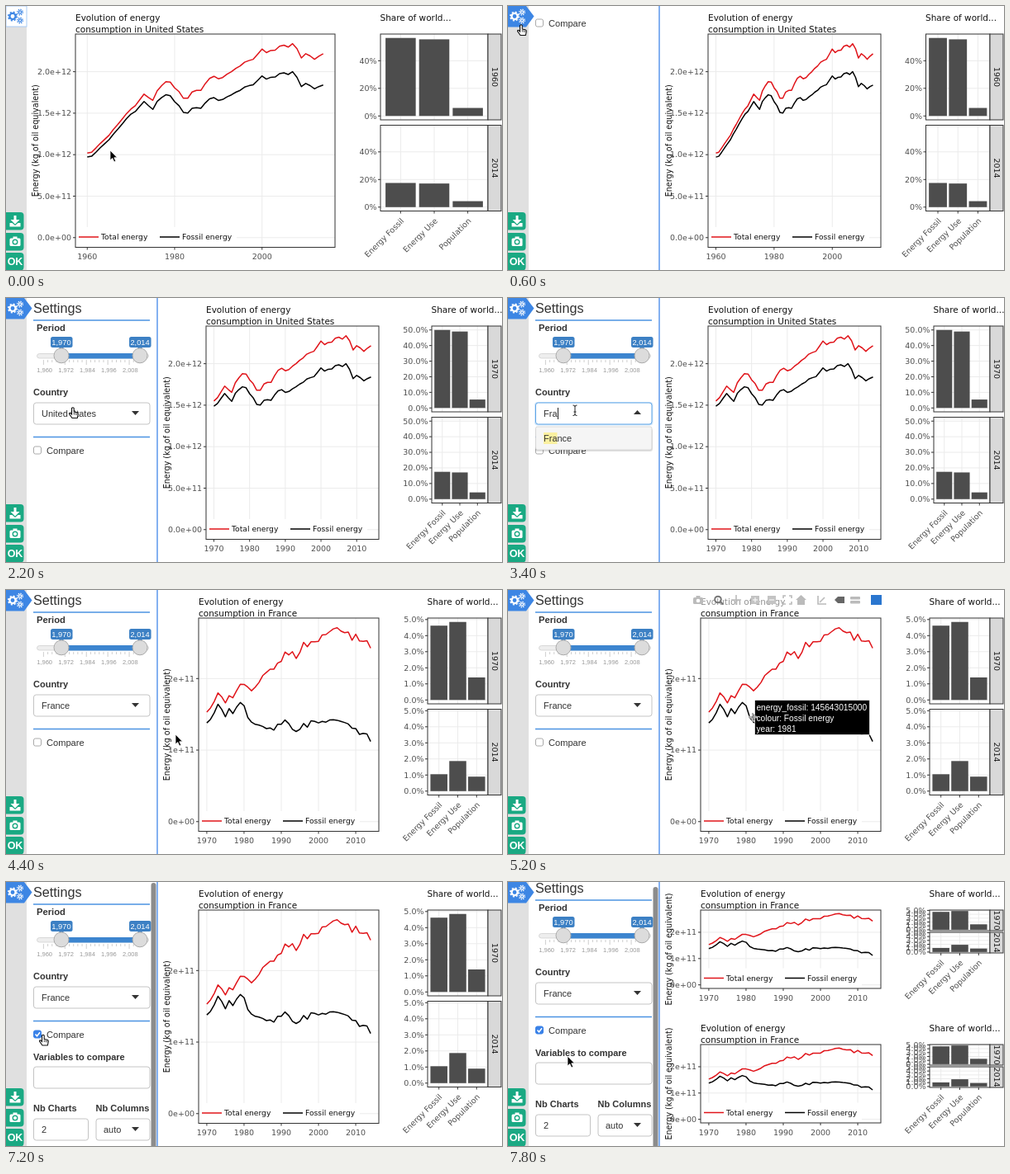
An HTML page for the animation above (8000 ms loop, 600 by 320 pixels).

```html
<!DOCTYPE html>
<html lang="en">
<head>
<meta charset="utf-8">
<title>Energy dashboard</title>
<style>
  html, body { margin: 0; width: 100%; height: 100%; overflow: hidden; background: #fff; }
  svg { display: block; width: 600px; height: 320px; }
  .plot { font-family: "DejaVu Sans", Verdana, sans-serif; }
  .ui { font-family: "Liberation Sans", Arial, sans-serif; }
</style>
</head>
<body>
<svg id="stage" viewBox="0 0 600 320"></svg>
<script>
const LOOP = 8000, STEP = 200;
const BLUE = '#3d86e4', RED = '#e0141a', GREEN = '#1aa983', GRID = '#ebebeb', DARK = '#333', TICK = '#4d4d4d';

// Piecewise linear value from [position, value...] rows.
function lerp(rows, at, col = 1) {
  const i = rows.findIndex(r => r[0] > at);
  if (i === 0) return rows[0][col];
  if (i < 0) return rows[rows.length - 1][col];
  const a = rows[i - 1], b = rows[i];
  return a[col] + (b[col] - a[col]) * (at - a[0]) / (b[0] - a[0]);
}

const usTotal = [
  1.02, 1.03, 1.08, 1.135, 1.185, 1.235, 1.305, 1.365, 1.43, 1.495, 1.55, 1.59, 1.66, 1.73, 1.69, 1.655,
  1.77, 1.83, 1.88, 1.875, 1.805, 1.76, 1.68, 1.68, 1.755, 1.775, 1.775, 1.855, 1.92, 1.945, 1.915, 1.93,
  1.97, 2, 2.04, 2.07, 2.115, 2.135, 2.15, 2.21, 2.273, 2.23, 2.256, 2.26, 2.308, 2.32, 2.297, 2.337,
  2.277, 2.165, 2.217, 2.19, 2.15, 2.187, 2.216];
const fossilShare = [[1960, .952], [1970, .96], [1973, .948], [1975, .934], [1978, .916], [1982, .899],
  [1985, .882], [1990, .864], [1995, .858], [2007, .856], [2009, .841], [2014, .83]];
const regions = {
  us: {
    name: 'United States', first: 1960, total: usTotal,
    fossil: usTotal.map((v, i) => v * lerp(fossilShare, 1960 + i)),
    ticks: [[0, '0.0e+00'], [.5, '5.0e+11'], [1, '1.0e+12'], [1.5, '1.5e+12'], [2, '2.0e+12']]
  },
  fr: {
    name: 'France', first: 1970,
    total: [1.53, 1.59, 1.68, 1.8, 1.745, 1.66, 1.76, 1.73, 1.83, 1.92, 1.918, 1.88, 1.83, 1.88, 1.945,
      2.04, 2.085, 2.13, 2.13, 2.215, 2.24, 2.37, 2.33, 2.375, 2.28, 2.365, 2.505, 2.445, 2.515, 2.515,
      2.52, 2.61, 2.615, 2.655, 2.695, 2.71, 2.665, 2.64, 2.65, 2.535, 2.62, 2.525, 2.52, 2.53, 2.425],
    fossil: [1.38, 1.43, 1.52, 1.64, 1.57, 1.465, 1.58, 1.51, 1.6, 1.665, 1.62, 1.45643015, 1.39, 1.36, 1.35,
      1.33, 1.3, 1.31, 1.28, 1.36, 1.36, 1.42, 1.37, 1.29, 1.26, 1.29, 1.37, 1.32, 1.41, 1.4,
      1.38, 1.4, 1.39, 1.42, 1.425, 1.41651854, 1.4, 1.385, 1.365, 1.305, 1.3, 1.22, 1.235, 1.225, 1.12],
    ticks: [[0, '0e+00'], [1, '1e+11'], [2, '2e+11']]
  }
};

const us2014 = [17.5, 17.1, 4.3], top60 = [56.5, 55.5, 5.8], top70 = [50, 49, 5.4];
const wide = { region: 'us', from: 1960, years: 20, left: 84, right: 398, axis: 36, barLeft: 453, barStep: 20, digits: 0, shares: [top60, us2014] };
const narrow = { ...wide, left: 242, right: 451, axis: 195, barLeft: 505.5 };
const recent = { ...narrow, from: 1970, years: 10, barLeft: 515, barStep: 10, digits: 1, shares: [top70, us2014] };
const france = { ...recent, region: 'fr', left: 233, barLeft: 510, barStep: 1, shares: [[4.62, 4.85, 1.4], [1.05, 1.87, .9]] };

// Time, x, y, shape
const pointer = [
  [0, 126, 175, 'arrow'], [200, 70, 95, 'arrow'], [400, 14, 24, 'hand'], [600, 16, 28, 'hand'], [800, 24, 42, 'arrow'],
  [1000, 46, 69, 'hand'], [1200, 46, 69, 'hand'], [1600, 67, 70, 'hand'], [1800, 67, 72, 'hand'], [2000, 74, 104, 'arrow'],
  [2200, 81, 138, 'hand'], [2600, 81, 136, 'beam'], [3400, 81, 136, 'beam'], [3600, 78, 165, 'hand'], [3800, 75, 172, 'hand'],
  [4000, 100, 172, 'arrow'], [4400, 205, 175, 'arrow'], [4600, 250, 155, 'cross'], [5200, 296, 154, 'cross'],
  [6000, 402, 157, 'cross'], [6200, 300, 165, 'cross'], [6400, 160, 180, 'arrow'], [6600, 60, 186, 'arrow'],
  [6800, 38, 185, 'hand'], [7000, 38, 185, 'hand'], [7400, 52, 196, 'arrow'], [7800, 72, 211, 'arrow']];
const hoverYears = [[4600, 1971], [5200, 1981], [6000, 2005]];

const rect = (x, y, w, h, fill, more = '') => `<rect x="${x}" y="${y}" width="${w}" height="${h}" fill="${fill}" ${more}/>`;
const line = (x1, y1, x2, y2, color, w = 1) => `<path d="M${x1} ${y1}L${x2} ${y2}" stroke="${color}" stroke-width="${w}"/>`;
const circle = (x, y, r, more) => `<circle cx="${x}" cy="${y}" r="${r}" ${more}/>`;
const path = (d, more) => `<path d="${d}" ${more}/>`;
const text = (x, y, str, size, fill = '#111', more = '') => `<text x="${x}" y="${y}" font-size="${size}" fill="${fill}" ${more}>${str}</text>`;
const END = 'text-anchor="end"', MID = 'text-anchor="middle"', BOLD = 'font-weight="bold"';
const group = (cls, body, more = '') => `<g class="${cls}" ${more}>${body}</g>`;

function lineScale(view, top, height) {
  const max = Math.max(...regions[view.region].total), width = view.right - view.left;
  return {
    x: year => view.left + width * (1 + 20 * (year - view.from) / (2014 - view.from)) / 22,
    y: v => top + height * (1 - (1 + 20 * v / max) / 22)
  };
}

function lineChart(view, top, height) {
  const { left, right, from } = view, region = regions[view.region], bottom = top + height;
  const { x, y } = lineScale(view, top, height);
  const curve = (data, color) => {
    const points = data.slice(from - region.first).map((v, i) => `${x(from + i).toFixed(1)},${y(v).toFixed(1)}`);
    return `<polyline points="${points.join(' ')}" fill="none" stroke="${color}" stroke-width="1.5" stroke-linejoin="round"/>`;
  };
  let out = text(left, top - 16, 'Evolution of energy', 10.5) + text(left, top - 2, 'consumption in ' + region.name, 10.5);
  for (const [v, label] of region.ticks) {
    out += line(left, y(v), right, y(v), GRID) + line(left - 3, y(v), left, y(v), DARK);
    out += text(left - 5, y(v) + 3.3, label, 9.5, TICK, END);
  }
  for (let year = from; year <= 2014; year += view.years) {
    out += line(x(year), top, x(year), bottom, GRID) + line(x(year), bottom, x(year), bottom + 3, DARK);
    out += text(x(year), bottom + 14.5, year, 9.5, TICK, MID);
  }
  out += curve(region.total, RED) + curve(region.fossil, '#000');
  const key = bottom - 12.5;
  out += rect(left + 1, key - 12, 194, 24, '#fff');
  [['Total energy', RED, 4], ['Fossil energy', '#000', 102]].forEach(([label, color, dx]) => {
    out += line(left + dx, key, left + dx + 24, key, color, 1.5) + text(left + dx + 27, key + 3.3, label, 9.2);
  });
  out += rect(left, top, right - left, height, 'none', `stroke="${DARK}"`);
  return out + text(0, 0, 'Energy (kg of oil equivalent)', 9.6, '#111',
    `${MID} transform="translate(${view.axis + 3},${top + height / 2}) rotate(-90)"`);
}

function barChart(view, top, height, gap) {
  const left = view.barLeft, right = 583, unit = (right - left) / 3.2;
  const max = Math.max(...view.shares.flat());
  let out = text(left - .5, top - 16, 'Share of world...', 10.5);
  view.shares.forEach((values, row) => {
    const y0 = top + row * (height + gap), y = v => y0 + height * (1 - (1 + 20 * v / max) / 22);
    const mid = i => left + unit * (i + .6);
    for (let v = 0; v <= max * 1.04; v += view.barStep) {
      out += line(left, y(v), right, y(v), GRID) + line(left - 3, y(v), left, y(v), DARK);
      out += text(left - 4.5, y(v) + 3.3, v.toFixed(view.digits) + '%', 9.5, TICK, END);
    }
    values.forEach((v, i) => {
      out += line(mid(i), y0, mid(i), y0 + height, GRID) + rect(mid(i) - unit * .45, y(v), unit * .9, y(0) - y(v), '#4d4d4d');
    });
    out += rect(left, y0, right - left, height, 'none', `stroke="${DARK}"`);
    out += rect(right, y0, 16, height, '#d9d9d9', `stroke="${DARK}"`);
    out += text(0, 0, row ? 2014 : view.from, 9.5, '#1a1a1a', `${MID} transform="translate(587.5,${y0 + height / 2}) rotate(90)"`);
    if (!row) return;
    ['Energy Fossil', 'Energy Use', 'Population'].forEach((label, i) => {
      const end = y0 + height;
      out += line(mid(i), end, mid(i), end + 3, DARK);
      out += text(0, 5, label, 9.5, TICK, `${END} transform="translate(${mid(i) + 1},${end + 9}) rotate(-45)"`);
    });
  });
  return out;
}

function charts(view, split) {
  if (!split) return lineChart(view, 34, 258.5) + barChart(view, 34, 104, 6.5);
  return [34, 197].map(top => lineChart(view, top, 95) + barChart(view, top, 25, 2)).join('');
}

function modebar() {
  const icon = 'fill="none" stroke="#bbb" stroke-width="1.6"';
  return rect(222, 2, 234, 18, '#fff', 'opacity=".55"') +
    rect(224, 9, 12, 8, '#bbb', 'rx="1.5"') + rect(227.5, 7, 5, 3, '#bbb') + circle(230, 13, 2.3, 'fill="#fff"') +
    circle(254, 11.5, 3.8, 'fill="none" stroke="#777" stroke-width="2"') + line(257, 14, 260, 17.5, '#777', 2) +
    path('M276 6V18M270 12H282', icon) +
    rect(294, 7, 10, 10, '#c4c4c4') + path('M299 9v6M296 12h6', 'stroke="#fff"') +
    rect(314, 7, 10, 10, '#c4c4c4') + path('M316 12h6', 'stroke="#fff"') +
    path('M333 10V7h3M340 7h3v3M343 14v3h-3M336 17h-3v-3', icon) +
    path('M348 12L354.500 6L361 12H359V18H350V12Z', 'fill="#bbb"') +
    path('M375 7V17H385M377 15l6-6', icon) +
    path('M395 12l4-4h8v8h-8z', 'fill="#666"') +
    rect(414, 8, 12, 3.5, '#bbb', 'rx="1"') + rect(414, 13, 12, 3.5, '#bbb', 'rx="1"') +
    rect(439, 6, 13, 12, '#2a76cf');
}

function tooltip(view, year) {
  const { x, y } = lineScale(view, 34, 258.5), value = regions.fr.fossil[year - 1970];
  const px = x(year), py = y(value), flip = px > 320;
  const box = flip ? px - 144.5 : px + 6, edge = flip ? box + 136 : box + 2;
  const tip = flip ? box + 139 : box, rows = [`energy_fossil: ${Math.round(value * 1e11)}`, 'colour: Fossil energy', 'year: ' + year];
  return rect(box, py - 21, 139, 42, '#000', 'stroke="#fff" stroke-width=".7"') +
    path(`M${tip} ${py - 5}L${px} ${py}L${tip} ${py + 5}Z`, 'fill="#000" stroke="#fff" stroke-width=".7"') +
    rows.map((row, i) => text(edge, py - 8.5 + 13 * i, row, 10.2, '#fff', flip ? END : '')).join('');
}

function gear(x, y, r, color) {
  const tooth = Math.PI * 2 * (r + 1) / 16;
  return circle(x, y, r - .6, `fill="none" stroke="${color}" stroke-width="${r * .55}"`) +
    circle(x, y, r + 1, `fill="none" stroke="${color}" stroke-width="1.6" stroke-dasharray="${tooth}"`);
}

function toolbar(open) {
  const color = open ? '#fff' : BLUE;
  let out = rect(0, 0, 25, 320, '#e0e0e0');
  out += open ? path('M0 0H22L31.500 12.500L22 25.500H0Z', `fill="${BLUE}"`) : rect(0, 0, 25, 25, '#fff', 'stroke="#a9cbf5"');
  out += gear(8, 12.5, 4.2, color) + gear(17, 7.5, 2.2, color) + gear(17, 17.5, 2.2, color);
  [250, 275, 299].forEach(y => out += rect(-3, y, 24.5, 21.5, GREEN, 'rx="4"'));
  out += path('M9.500 254h3v5h4l-5.500 5.500l-5.500-5.500h4zM4.500 263h3l3.500 3l3.500-3h3v4.500h-13z', 'fill="#fff"');
  out += rect(4.5, 281.5, 13, 9.5, '#fff', 'rx="1.5"') + rect(8.5, 279.5, 5, 3, '#fff') +
    circle(11, 286, 2.8, `fill="#fff" stroke="${GREEN}" stroke-width="1.4"`);
  return out + text(11, 314, 'OK', 12.5, '#fff', `${BOLD} ${MID}`);
}

function slider(low) {
  const at = year => 45.4 + (year - 1960) * 2.16;
  let out = rect(37.5, 67.5, 135, 5.5, '#eee', 'rx="3" stroke="#ccc" stroke-width=".7"') +
    rect(at(low), 67, at(2014) - at(low), 6.5, '#3c85cf');
  for (let i = 0; i <= 22; i++) out += line(at(1960 + i * 2.4), 75, at(1960 + i * 2.4), i % 5 ? 78 : 81, '#bbb', .7);
  for (let year = 1960; year <= 2008; year += 12)
    out += text(at(year) + 1.2, 90, year.toLocaleString('en-US'), 7.5, '#999', MID);
  [low, 2014].forEach(year => {
    out += rect(at(year) - 13, 47, 26.5, 13, '#3c80c4', 'rx="2.5"') + path(`M${at(year) - 3} 60h6l-3 3z`, 'fill="#3c80c4"');
    out += text(at(year), 57, year.toLocaleString('en-US'), 9.3, '#fff', MID);
    out += circle(at(year), 69.8, 9, 'fill="#dcdcdc" stroke="#aaa"');
  });
  return out;
}

const field = (x, y, w, border = '#c4c4c4') => rect(x, y, w, 26, '#fff', `rx="3" stroke="${border}"`);
const caret = (x, y, up) => path(up ? `M${x - 4.5} ${y + 2}h9l-4.500-5z` : `M${x - 4.5} ${y - 2}h9l-4.500 5z`, 'fill="#333"');

function checkbox(y, checked) {
  return rect(33.5, y - 9, 9, 9, checked ? '#3a82e8' : '#fff', `rx="2" stroke="${checked ? '#3a82e8' : '#aaa'}"`) +
    (checked ? path(`M35.500 ${y - 4.5}l2 2.300l3.500-4.500`, 'fill="none" stroke="#fff" stroke-width="1.5"') : '') +
    text(49, y, 'Compare', 11.1, DARK);
}

function dropdown(typed) {
  const countries = ['Albania', 'Algeria', 'Angola', 'Argentina', 'Finland', 'France'];
  const rows = countries.filter(name => name.startsWith(typed)), mark = [0, 7, 10.5, 16.5][typed.length];
  let out = rect(32, 126, 143.5, 28.5, '#cfe5fa', 'rx="4"') + field(33.5, 127, 140.5, '#5fa5e6');
  out += text(43, 144, typed, 11, DARK) + line(44 + mark, 133, 44 + mark, 147, '#222') + caret(156.5, 139, true);
  out += rect(33, 158, 142, 8 + 20 * rows.length, '#000', 'rx="3" opacity=".13"');
  out += rect(33.5, 156, 140.5, 8 + 20 * rows.length, '#f5f5f5', 'rx="2" stroke="#ccc" stroke-width=".7"');
  rows.forEach((name, i) => {
    const y = 174 + 20 * i;
    if (mark) out += rect(43, y - 11, mark, 14, '#fbf0a0');
    out += text(43, y, name, 11, DARK);
  });
  return out;
}

function settings(t) {
  if (t < 800) return checkbox(25, false);
  const low = Math.round(lerp([[1200, 1960], [1600, 1970]], t));
  const typing = t >= 2400 && t < 3800;
  let out = text(33, 18, 'Settings', 16.2, DARK) + line(33, 27, 174, 27, '#4b93e2', 1.4);
  out += text(37, 40, 'Period', 11.2, DARK, BOLD) + slider(low);
  out += text(33, 118, 'Country', 11, DARK, BOLD);
  out += field(33.5, 127, 140.5) + line(33, 168.5, 174, 168.5, '#4b93e2', 1.4) + checkbox(189, t >= 6800);
  if (typing) out += dropdown('Fra'.slice(0, Math.max(0, (t - 2800) / 200)));
  else out += text(43, 144, regions[t < 3800 ? 'us' : 'fr'].name, 11, DARK) + caret(156.5, 139);
  if (t >= 7000) {
    out += text(33, 216, 'Variables to compare', 11, DARK, BOLD) + field(33.5, 224, 140.5);
    out += text(33, 278, 'Nb Charts', 11, DARK, BOLD) + text(108.5, 278, 'Nb Columns', 11, DARK, BOLD);
    out += field(33.5, 287, 66) + text(43, 304, '2', 11, DARK);
    out += field(109, 287, 65) + text(118, 304, 'auto', 11, DARK) + caret(156.5, 299);
  }
  return out;
}

function panel(t) {
  const scroll = t >= 7600 ? 5 : 0;
  return rect(25, 0, 158, 320, '#fff') + group('ui', settings(t), `transform="translate(0,${-scroll})"`) +
    (t >= 7000 ? rect(175.5, 1 + scroll, 6, 330, '#8c8c8c', 'rx="3"') : '') +
    line(183, 0, 183, 320, '#5b97ec', 1.5);
}

const cursors = {
  arrow: path('M0 0V12L2.800 9.500L4.800 14L6.800 13.100L4.800 8.800H8.500Z', 'fill="#000" stroke="#fff" stroke-width=".8"'),
  hand: path('M-1.500-4.500Q0-6 1.200-4.500V0L5 .8Q6.500 1.200 6.300 3L5.300 7.500H-1L-4.500 2.500Q-4.500 1-3 1.500L-1.500 3Z',
    'fill="#fff" stroke="#111" stroke-width="1.100"') + path('M1.200 1v2.500M3 1.200v2.500M4.800 1.500v2.500', 'stroke="#111" stroke-width=".7"'),
  beam: path('M-2.500-6Q0-6 0-4.500Q0-6 2.500-6M0-5V6M-2.500 6.500Q0 6.500 0 5Q0 6.500 2.500 6.500M-1.500 2h3', 'fill="none" stroke="#222"'),
  cross: path('M-5.500 0H5.500M0-5.500V5.500', 'stroke="#fff" stroke-width="2.600"') + path('M-5 0H5M0-5V5', 'stroke="#555"')
};

function cursor(t) {
  const shape = pointer.filter(p => p[0] <= t).pop()[3];
  return group('', cursors[shape], `transform="translate(${lerp(pointer, t, 1)},${lerp(pointer, t, 2)})"`);
}

function scene(t) {
  const open = t >= 600, hover = t >= 4600 && t <= 6000;
  const view = !open ? wide : t < 1800 ? narrow : t < 4200 ? recent : france;
  let out = rect(0, 0, 600, 320, '#fff') + (open ? panel(t) : '');
  out += group('plot', charts(view, t >= 7400));
  if (t >= 4600 && t <= 6200) out += modebar();
  if (hover) out += group('ui', tooltip(view, Math.round(lerp(hoverYears, t))));
  return out + group('ui', toolbar(open)) + cursor(t);
}

const stage = document.getElementById('stage'), start = performance.now();
let shown = -1;
function tick() {
  const t = Math.floor((performance.now() - start) % LOOP / STEP) * STEP;
  if (t !== shown) stage.innerHTML = scene(shown = t);
  requestAnimationFrame(tick);
}
tick();
</script>
</body>
</html>
```
